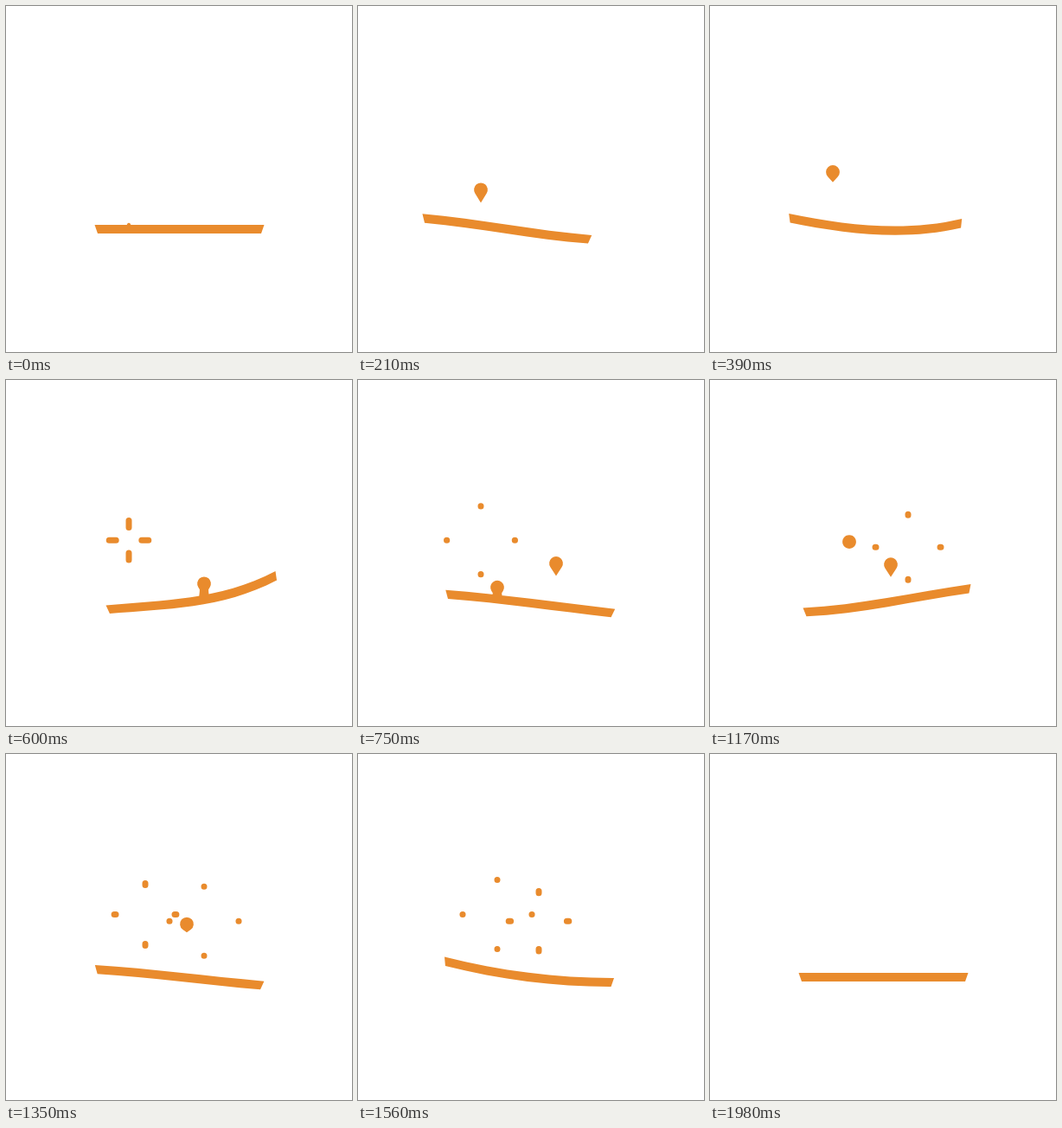
Recreate the animation shown at these times as an HTML page. Size 400x400 px, loop 2040 ms.

```html
<!DOCTYPE html>
<html lang="en">
<head>
<meta charset="utf-8">
<title>Bouncing bar</title>
<style>
html, body { margin: 0; width: 100%; height: 100%; overflow: hidden; background: #fff; }
svg { display: block; width: 100%; height: 100%; }
</style>
</head>
<body>
<svg viewBox="0 0 400 400"><path id="shape" fill="#e98b2d"/></svg>
<script>
const LOOP = 2040, STEP = 30;
const BALL_R = 7.9, REACH = 40, RAY_R = 3.5;

// time, shift, left lift, right lift, middle lift, S-bend, stretch
const poses = [
  [0, 0, 0, 0, 0, 0, 0],
  [240, -30, -14, 12, 0, -3, 0],
  [390, -9.3, -13, -7, 1, -3, 2],
  [540, 15, 13, -34, -1.5, -4, 0],
  [600, 13, 7.5, -32, -1.8, -7, 0],
  [780, -3, -12, 16, 0, 0, 0],
  [930, -0.5, -3.5, -6, 0.7, 2, 0.7],
  [1170, 4, 10.5, -17, -1, 3, -1],
  [1400, -1, -14, 15, 0, -2, 0],
  [1560, -2.5, -18.5, 6, 0, 0, 0],
  [1740, 0, 3, -4, 0, 0, 0],
  [1950, 0, 0, 0, 0, 0, 0]
];

const balls = [
  { x: 142, top: 185, burst: 573 },
  { x: 229, top: 193, burst: 1052 },
  { x: 161, top: 185.3, burst: 1262 },
  { x: 209, top: 193, burst: 1482 }
];

const rays = [
  { dx: 0, dy: -1, life: 358 },
  { dx: 1, dy: 0, life: 358 },
  { dx: 0, dy: 1, life: 358 },
  { dx: -1, dy: 0, life: 340 }
];

const shape = document.getElementById("shape");
const clamp = (v, lo, hi) => Math.min(hi, Math.max(lo, v));
const pt = (x, y) => x.toFixed(2) + " " + y.toFixed(2) + " ";

function slope(i, c) {
  const a = poses[i - 1], b = poses[i + 1];
  return a && b ? (b[c] - a[c]) / (b[0] - a[0]) : 0;
}

// Smooth curve through the poses
function poseAt(t) {
  const i = poses.findIndex(p => p[0] > t) - 1;
  if (i < 0) return poses[poses.length - 1].slice(1);
  const a = poses[i], b = poses[i + 1];
  const span = b[0] - a[0], u = (t - a[0]) / span, v = 1 - u;
  return a.slice(1).map((_, k) => {
    const c = k + 1;
    return v * v * (1 + 2 * u) * a[c] + u * u * (3 - 2 * u) * b[c]
      + span * u * v * (v * slope(i, c) - u * slope(i + 1, c));
  });
}

function makeBar(t) {
  const [shift, left, right, middle, bend, stretch] = poseAt(t);
  const x0 = 102.5 + shift - stretch, x3 = 298.5 + shift + stretch;
  const y0 = 253 + left, y3 = 253 + right;
  const control = 2 * (253 + middle) - (y0 + y3) / 2;
  const y1 = (y0 + 2 * control) / 3 + bend, y2 = (y3 + 2 * control) / 3 - bend;
  const third = (x3 - x0) / 3;

  // Slanted end corner, turned with the end of the bar
  const corner = (x, y, dy, side) => {
    const len = Math.hypot(third, dy), cx = third / len, cy = dy / len;
    return [x - 10 * cy + side * 3.5 * cx, y + 10 * cx + side * 3.5 * cy];
  };
  const a = corner(x0, y0, y1 - y0, 1), b = corner(x3, y3, y3 - y2, -1);
  const inner = (b[0] - a[0]) / 3;
  return {
    path: "M" + pt(x0, y0) + "C" + pt(x0 + third, y1) + pt(x3 - third, y2) + pt(x3, y3)
      + "L" + pt(...b) + "C" + pt(b[0] - inner, y2 + 10) + pt(a[0] + inner, y1 + 10) + pt(...a) + "Z",
    yAt(x) {
      const u = (x - x0) / (x3 - x0), v = 1 - u;
      return v * v * v * y0 + 3 * v * v * u * y1 + 3 * v * u * u * y2 + u * u * u * y3;
    }
  };
}

function rise(ball, left, bar) {
  const grow = clamp((590 - left) / 60, 0, 1);
  if (!grow) return "";
  const barY = bar.yAt(ball.x), x = ball.x;
  const r = BALL_R * grow * clamp(0.72 + left / 285, 0, 1);
  const y = Math.min(ball.top + (0.0144 * left) ** 2, barY + 5);
  const tail = grow < 1 ? 0 : 8 + 7.2 * Math.sqrt(clamp((left - 120) / 223, 0, 1));
  const tip = Math.max(tail, r * 1.01);
  const cos = r / tip, sin = Math.sqrt(1 - cos * cos);
  let d = "M" + pt(x - r * sin, y + r * cos) + `A${r} ${r} 0 1 1 ` + pt(x + r * sin, y + r * cos)
    + "L" + pt(x, y + tip) + "Z";

  // Sticky neck that thins out until the ball breaks free
  const neck = clamp((left - 380) / 16, 0, 4.5);
  if (neck && y < barY - 4) {
    const mid = (y + barY) / 2, foot = barY + 3;
    d += "M" + pt(x + neck + 1, y + 4) + "Q" + pt(x + neck, mid) + pt(x + neck + 1.5, foot)
      + "L" + pt(x - neck - 1.5, foot) + "Q" + pt(x - neck, mid) + pt(x - neck - 1, y + 4) + "Z";
  }
  return d;
}

function burst(ball, age) {
  const fade = Math.exp(-0.0235 * age);
  const r = REACH * (1 - fade), half = (7 + 15 * fade) / 2, w = RAY_R;
  const from = Math.max(0, r - half) + w, to = Math.max(from + 0.1, r + half - w);
  return rays.filter(ray => age < ray.life).map(({ dx, dy }) => {
    const x = ball.x, y = ball.top + 0.2;
    const at = (dist, side) => pt(x + dx * dist - dy * side, y + dy * dist + dx * side);
    const cap = `A${w} ${w} 0 0 `;
    return "M" + at(from, -w) + "L" + at(to, -w) + cap + "1 " + at(to, w)
      + "L" + at(from, w) + cap + "1 " + at(from, -w) + "Z";
  }).join("");
}

function draw(now) {
  const t = Math.floor((now % LOOP) / STEP) * STEP;
  const bar = makeBar(t);
  shape.setAttribute("d", bar.path + balls.map(ball => {
    const age = t - ball.burst;
    return age < 0 ? rise(ball, -age, bar) : burst(ball, age);
  }).join(""));
}

const start = performance.now();
function tick() {
  draw(performance.now() - start);
  requestAnimationFrame(tick);
}
tick();
</script>
</body>
</html>
```
